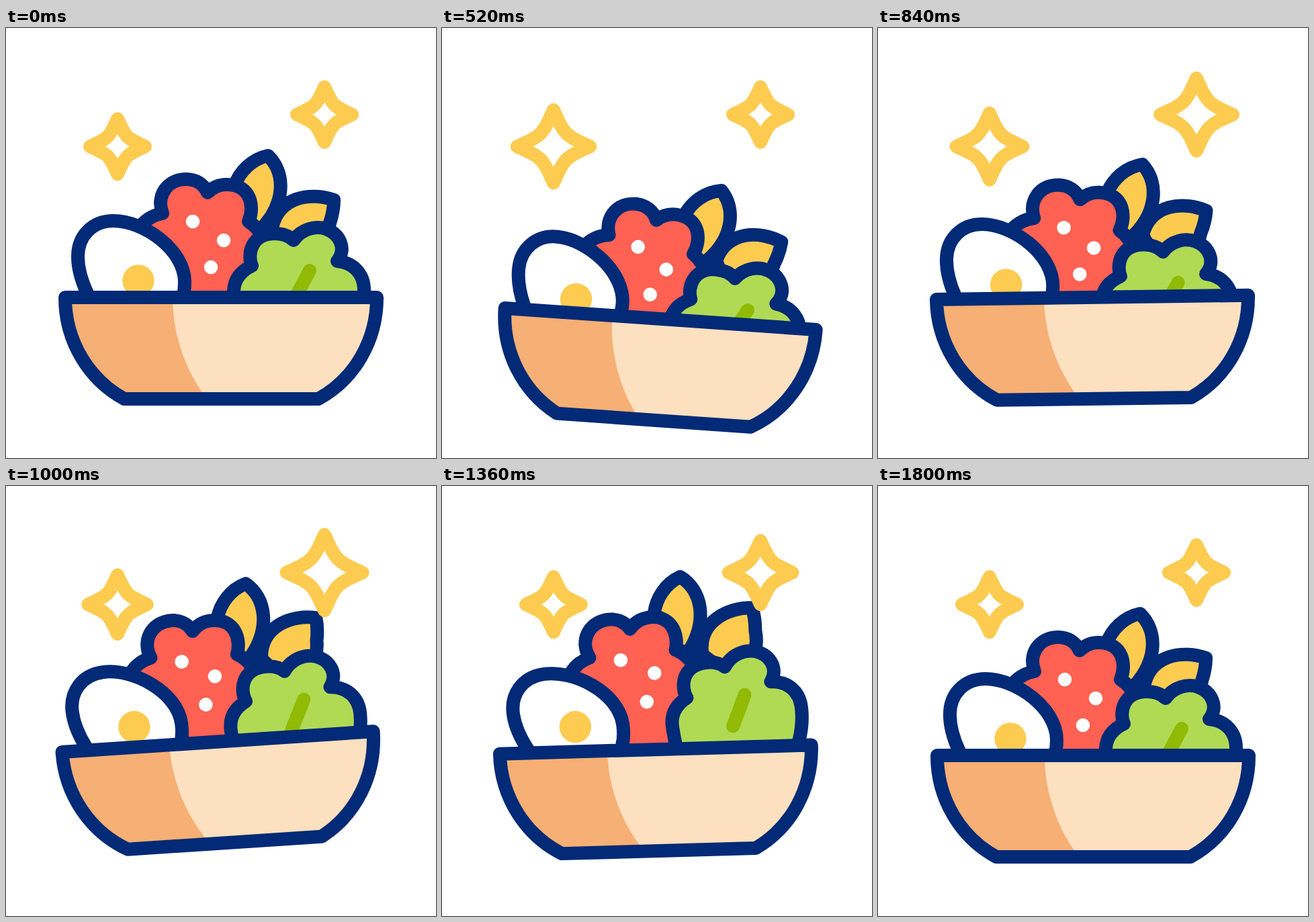
Write an HTML page that moves like this. It is 640x640 px and loops after 2 s.

```html
<!DOCTYPE html>
<html lang="en">
<head>
<meta charset="utf-8">
<title>Salad bowl</title>
<style>
  html, body { margin: 0; width: 100%; height: 100%; overflow: hidden; background: #fff; }
  svg { display: block; width: 100vw; height: 100vh; }
  .line { stroke: #022a76; stroke-width: 20; stroke-linecap: round; stroke-linejoin: round; }
  .star { fill: none; stroke: #fdcb50; stroke-width: 20; stroke-linejoin: round; }
</style>
</head>
<body>
<svg viewBox="0 0 640 640">
  <defs>
    <clipPath id="inside"><path d="M88 401C88 466 123 523 176 552H465C518 523 552 466 552 401Z"/></clipPath>
  </defs>
  <g id="dish">
    <g id="leafLeft" class="line" fill="#fdcb50">
      <path d="M378 303L385 360"/>
      <path d="M390 190C366 195 348 213 340 235C334 260 352 292 376 303C418 262 416 215 390 190Z"/>
    </g>
    <g id="leafRight" class="line" fill="#fdcb50">
      <path d="M396 298L385 360"/>
      <path d="M488 256C455 244 405 250 396 298C420 345 475 345 482 290C486 278 488 268 488 256Z"/>
    </g>
    <g id="meat">
      <path class="line" fill="#ff6152" d="M361 288C370 268 366 233 328 233C317 233 307 238 300 245C294 232 282 225 268 225C240 225 223 250 233 276C208 280 190 300 186 330L235 470H375C400 400 402 312 361 288Z"/>
      <g fill="#fff">
        <circle cx="278" cy="288" r="10.3"/>
        <circle cx="324" cy="316" r="10.3"/>
        <circle cx="305" cy="356" r="10.3"/>
      </g>
    </g>
    <path id="egg" class="line" fill="#fff" d="M160 287C128 287 107 310 107 340C107 362 114 380 121 395C135 425 165 447 200 447C240 447 266 420 266 378C266 330 205 287 160 287Z"/>
    <circle id="yolk" cx="197" cy="376" r="23.7" fill="#fdcb50"/>
    <g id="lettuce">
      <path class="line" fill="#b0da54" d="M348 490C341 440 339 405 339 391C340 372 351 361 366 354C359 338 364 306 400 306C412 306 422 310 428 316C440 299 460 294 476 299C496 306 508 328 493 347C517 349 533 366 533 390C533 420 520 460 490 490Z"/>
      <path d="M452 361L428.5 405" stroke="#90ba04" stroke-width="20" stroke-linecap="round"/>
    </g>
    <g clip-path="url(#inside)">
      <rect x="70" y="390" width="500" height="180" fill="#fce0bf"/>
      <path d="M70 390H248V401C248 458 268 512 299 552V570H70Z" fill="#f6af74"/>
    </g>
    <path class="line" fill="none" d="M88 401C88 466 123 523 176 552H465C518 523 552 466 552 401Z"/>
  </g>
  <path id="starLeft" class="star"/>
  <path id="starRight" class="star"/>
</svg>
<script>
const LOOP = 2000, STEP = 40;
const el = id => document.getElementById(id);
const smooth = u => u * u * (3 - 2 * u);

// Same curve as cubic-bezier(.6, 0, .4, 1)
function swing(u) {
  let lo = 0, hi = 1;
  for (let i = 0; i < 24; i++) {
    const s = (lo + hi) / 2, r = 1 - s;
    if (1.8 * s * r * r + 1.2 * s * s * r + s * s * s < u) lo = s; else hi = s;
  }
  return smooth(lo);
}

function track(t, times, values, ease) {
  if (t <= times[0]) return values[0];
  for (let i = 1; i < times.length; i++) {
    if (t < times[i]) {
      const u = (t - times[i - 1]) / (times[i] - times[i - 1]);
      return values[i - 1] + (values[i] - values[i - 1]) * ease(u);
    }
  }
  return values[values.length - 1];
}

const DISH_TIMES = [40, 560, 1080, 1600];
const FOOD_TIMES = DISH_TIMES.map(t => t + 160);

// pivot, then [x, y, angle] at the low and the high point of the bounce
const foods = {
  leafLeft:  { pivot: [390, 190], low: [9.6, 18.7, 5],    high: [-28, -48, -12] },
  leafRight: { pivot: [489, 257], low: [4.7, 24.4, 6],    high: [-19.7, -66.5, -18] },
  meat:      { pivot: [302, 320], low: [-1, 12.9, 4.5],   high: [-1.6, -27.2, -9.5] },
  egg:       { pivot: [197, 376], low: [-5.2, 5, 2.5],    high: [7, -8.5, -7.5] },
  yolk:      { pivot: [197, 376], low: [-5.7, 5.8, 0],    high: [4.9, -12.8, 0] },
  lettuce:   { pivot: [445, 350], low: [-3.9, 23.6, 3],   high: [2, -39.5, -6.5] }
};

function place(id, [px, py], x, y, angle) {
  el(id).setAttribute("transform", `translate(${x} ${y}) rotate(${angle} ${px} ${py})`);
}

function drawStar(id, cx, cy, r) {
  const c = r * 0.31;
  const arm = (x, y, kx, ky) => `C${kx * c} ${ky * c} ${kx * c} ${ky * c} ${x * r} ${y * r}`;
  el(id).setAttribute("d", `M0 ${-r}` + arm(1, 0, 1, -1) + arm(0, 1, 1, 1) +
    arm(-1, 0, -1, 1) + arm(0, -1, -1, -1) + "Z");
  el(id).setAttribute("transform", `translate(${cx} ${cy})`);
}

function render(t) {
  place("dish", [320, 476], 0,
    track(t, DISH_TIMES, [0, 32, -22, 0], swing),
    track(t, DISH_TIMES, [0, 4, -4, 0], swing));

  for (const [id, { pivot, low, high }] of Object.entries(foods)) {
    const pose = low.map((v, i) => track(t, FOOD_TIMES, [0, v, high[i], 0], swing));
    place(id, pivot, ...pose);
  }

  drawStar("starLeft", 166, 176.3, track(t, [40, 600, 1160], [41, 55, 41], smooth));
  drawStar("starRight", 474, 128.8, track(t, [520, 1000, 1080, 1600], [41, 56.5, 56.5, 41], swing));
}

const start = performance.now();
function tick() {
  const t = (performance.now() - start) % LOOP;
  render(Math.floor(t / STEP) * STEP);
  requestAnimationFrame(tick);
}
tick();
</script>
</body>
</html>
```
